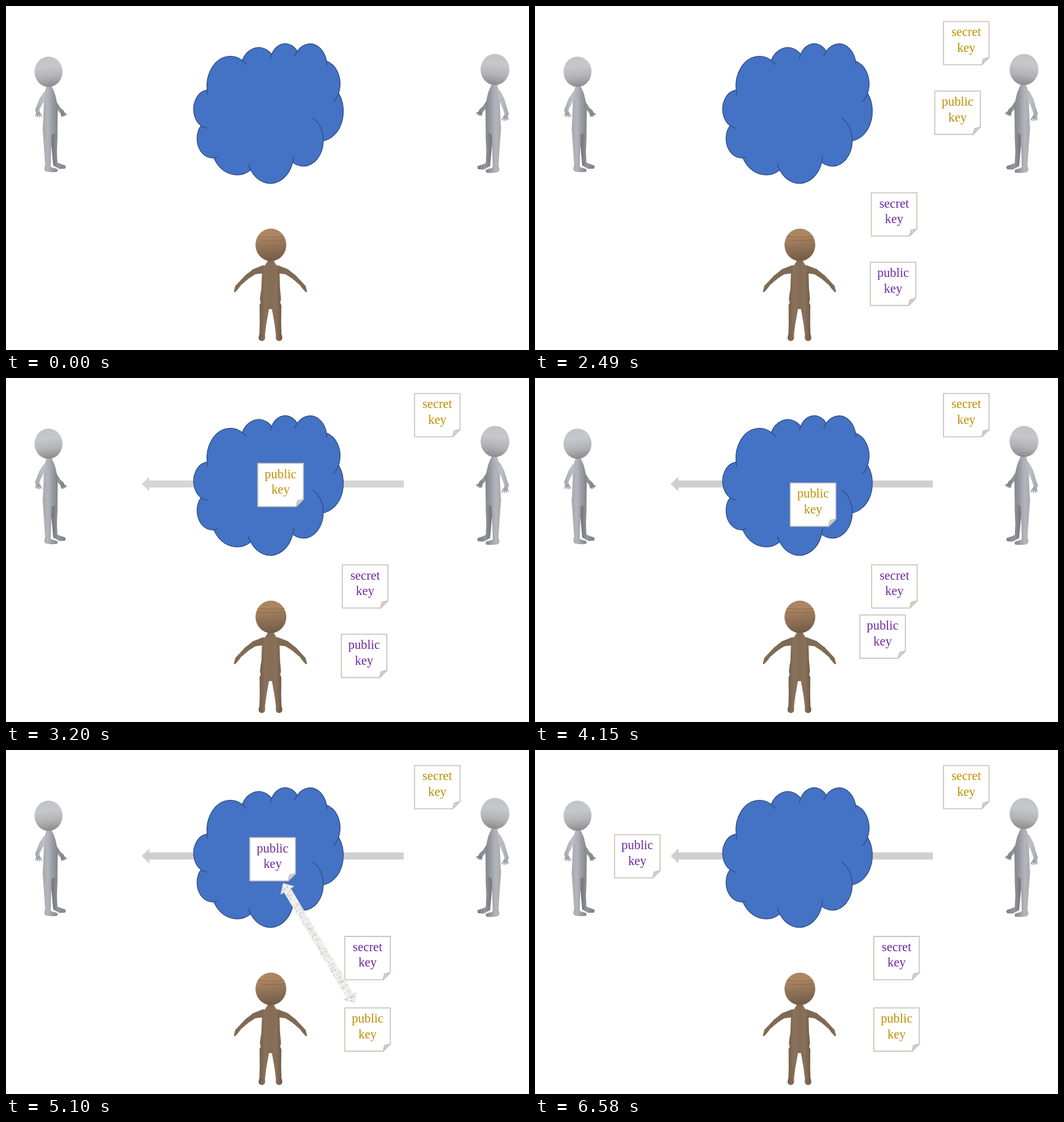
Write an HTML page with a canvas that moves like this. It is 923x607 px and loops after 7.04 s.

```html
<!DOCTYPE html>
<html lang="en">
<head>
<meta charset="utf-8">
<title>Public key exchange</title>
<style>
  html, body { margin: 0; width: 100%; height: 100%; overflow: hidden; background: #fff; }
  canvas { display: block; }
</style>
</head>
<body>
<canvas id="stage" width="923" height="607"></canvas>
<script>
const LOOP = 7040, MOVE = 680;
const GOLD = '#bf8f00', PURPLE = '#6c2aa0';
const stage = document.getElementById('stage');
const ctx = stage.getContext('2d');

const clamp = v => Math.max(0, Math.min(1, v));
const mix = (a, b, p) => a + (b - a) * p;
const ease = p => p < 0.5 ? 2 * p * p : 1 - 2 * (1 - p) * (1 - p);

// Progress 0..1 that advances in steps of `gap` ms from `start`.
function stepped(t, start, gap, length, lead = 0) {
  if (t < start) return 0;
  return clamp((Math.floor((t - start) / gap) * gap + lead) / length);
}

function ramp(x0, y0, x1, y1, ...colors) {
  const g = ctx.createLinearGradient(x0, y0, x1, y1);
  colors.forEach((c, i) => g.addColorStop(i / (colors.length - 1), c));
  return g;
}

// Rounded, tapering body part through joints [x, y, radius].
function limb(fill, ...joints) {
  ctx.beginPath();
  for (let i = 1; i < joints.length; i++) {
    for (let p = 0; p <= 1; p += 1 / 16) {
      const [x, y, r] = joints[i].map((v, k) => mix(joints[i - 1][k], v, p));
      ctx.moveTo(x + r, y);
      ctx.arc(x, y, r, 0, 7);
    }
  }
  ctx.fillStyle = fill;
  ctx.fill();
}

function head(rx, ry, ...colors) {
  ctx.beginPath();
  ctx.ellipse(0, 0, rx, ry, 0, 0, 7);
  ctx.fillStyle = ramp(0, -ry, rx * 0.3, ry, ...colors);
  ctx.fill();
}

function hand(color, x, y, angle, size) {
  for (let i = 0; i < 4; i++) {
    const a = angle + i * 0.3, r = size * (1 - 0.06 * i);
    limb(color, [x, y, 2], [x + r * Math.cos(a), y + r * Math.sin(a), 0.9]);
  }
}

// Side view around the head centre; `facing` is 1 for right, -1 for left.
function sidePerson(x, y, facing, size, reach) {
  const far = ramp(6, 0, 28, 0, '#74767e', '#94969c', '#80828a');
  const skin = ramp(-11, 0, 18, 0, '#a5a8af', '#b4b6bb', '#9699a1', '#7e8087');
  ctx.save();
  ctx.translate(x, y);
  ctx.scale(facing * size, size);
  hand('#7c7e86', 22, 70, 0.5, 11);
  limb(far, [14, 58, 3], [19, 66, 3], [24, 71, 3.5]);
  limb(far, [9, 100, 7], [10, 118, 6], [10.5, 140, 4.5], [12, 163, 4], [20, 167, 4.5], [27, 168, 3.2]);
  limb(skin, [1, 25, 4], [2, 42, 10], [4, 62, 12.5], [3, 98, 13]);
  limb(skin, [-2, 100, 8.5], [-1.5, 134, 6.5], [-1, 165, 5], [-2, 171, 5.5], [5, 173, 4.3], [13, 174, 3]);
  hand('#9fa2aa', -19, 42 + 26 * reach, 1, 13);
  limb(ramp(-22, 0, 2, 0, '#a6a9b0', '#bec0c4', '#aaacb2'),
    [-4, 42, 7], [-12, 42 + 8 * reach, 4.5], [-17, 42 + 19 * reach, 3.5], [-20, 42 + 26 * reach, 3.6]);
  head(24.7, 26.8, '#c2c3c7', '#c6c7ca', '#b2b2b5', '#88878b');
  ctx.restore();
}

function frontPerson() {
  const skin = ramp(-20, 0, 20, 0, '#725e4b', '#89715a', '#846c55', '#8a7058', '#6f5a46');
  ctx.save();
  ctx.translate(466.7, 421.5);
  for (const side of [-1, 1]) {
    const at = (x, y, r) => [side * x, y, r];
    limb('#806a54', at(12, 43, 7), at(28, 47, 5), at(42, 57, 4), at(54, 68.5, 3), at(59, 74.5, 3.4), at(63, 82, 1.6));
    limb(skin, at(10.5, 108, 8.8), at(13, 138, 6), at(14.5, 157, 5), at(15.2, 164, 5.8));
  }
  limb(skin, [0.5, 28, 4.5], [0.5, 49, 15.5], [0.5, 78, 16.5], [0, 95, 18.5]);
  ctx.translate(0.8, 0);
  head(27.2, 28.8, '#ad8663', '#ab8562', '#957457', '#836850', '#705945');
  ctx.strokeStyle = 'rgba(85,60,38,.2)';
  ctx.beginPath();
  for (const y of [-15, -9]) {
    ctx.moveTo(-24, y);
    ctx.quadraticCurveTo(0, y + 3, 24, y);
  }
  ctx.stroke();
  ctx.restore();
}

// Cloud lobes, clockwise: first point, radius, and the degrees each arc runs on inside before and after.
const LOBES = [
  [354.9, 148.3, 41.4, 9, 14], [416.8, 95.9, 32.7, 0, 0], [468.8, 85.2, 26.8, 14, 0],
  [514, 79.8, 29.8, 17, 11], [565.7, 97.2, 32.7, 0, 26], [587, 153.9, 41.5, 0, 0],
  [560, 238, 35.4, 64, 0], [505.9, 275.8, 41.4, 12, 12], [431.9, 289.5, 47.3, 0, 0],
  [366.6, 267.8, 26.7, 15, 0], [344.1, 211.1, 26.6, 26, 0]
];

function cloudPaths() {
  const tall = 1.273, rad = Math.PI / 180;
  const outline = new Path2D(), creases = new Path2D();
  LOBES.forEach(([x, y, r, before, after], i) => {
    const [nx, ny] = LOBES[(i + 1) % LOBES.length];
    // Centre of the arc, found where the lobe is a circle.
    const dx = (nx - x) / 2, dy = (ny - y) / tall / 2, half = Math.hypot(dx, dy);
    const k = Math.sqrt(Math.max(0, r * r - half * half)) / half;
    const cx = x + dx - dy * k, cy = y + (dy + dx * k) * tall;
    const angle = (u, v) => Math.atan2((v - cy) / tall, u - cx);
    const from = angle(x, y), to = angle(nx, ny);
    const arc = (path, a, b) => path.ellipse(cx, cy, r, r * tall, 0, a, b);
    arc(outline, from, to);
    for (const [end, sweep] of [[from, -before], [to, after]]) {
      if (!sweep) continue;
      const a = Math.min(end, end + sweep * rad), b = Math.max(end, end + sweep * rad);
      creases.moveTo(cx + r * Math.cos(a), cy + r * tall * Math.sin(a));
      arc(creases, a, b);
    }
  });
  outline.closePath();
  return [outline, creases];
}

const [cloudOutline, cloudCreases] = cloudPaths();

function cloud() {
  ctx.fillStyle = '#4472c4';
  ctx.fill(cloudOutline);
  ctx.strokeStyle = '#29497f';
  ctx.lineWidth = 1.3;
  ctx.stroke(cloudOutline);
  ctx.stroke(cloudCreases);
}

function poly(...pts) {
  ctx.beginPath();
  pts.forEach(([x, y]) => ctx.lineTo(x, y));
  ctx.closePath();
}

function note(x, y, word, color) {
  const w = 80.3, h = 76.3, d = 12.8;
  const fold = [[x + w - d, y + h], [x + w - d * 0.8, y + h - d * 0.8], [x + w, y + h - d]];
  poly([x, y], [x + w, y], fold[2], fold[0], [x, y + h]);
  ctx.fillStyle = '#fff';
  ctx.fill();
  ctx.strokeStyle = '#c9c4bd';
  ctx.lineWidth = 1.8;
  ctx.lineJoin = 'round';
  ctx.stroke();
  poly(...fold);
  ctx.fillStyle = '#d3d0cc';
  ctx.fill();
  ctx.stroke();
  ctx.fillStyle = color;
  ctx.font = '22.4px "Liberation Serif", serif';
  ctx.textAlign = 'center';
  ctx.fillText(word, x + w / 2, y + 26);
  ctx.fillText('key', x + w / 2, y + 53.4);
}

// Arrow outline along the x axis; `tail` adds a second head at the far end.
function arrow(len, head, wide, thin, tail) {
  const side = s => [
    [head, s * wide], [head, s * thin],
    ...(tail ? [[len - head, s * thin], [len - head, s * wide]] : [[len, s * thin]])
  ];
  poly([0, 0], ...side(-1), ...(tail ? [[len, 0]] : []), ...side(1).reverse());
}

function longArrow() {
  ctx.save();
  ctx.translate(239.5, 187);
  arrow(462.5, 13.5, 13, 6.2, false);
  ctx.fillStyle = '#d0cece';
  ctx.fill();
  ctx.restore();
}

function marbleArrow() {
  const len = 246, wide = 14.3;
  ctx.save();
  ctx.translate(489, 235);
  ctx.rotate(Math.atan2(211, 126));
  arrow(len, 15, wide, 7, true);
  ctx.fillStyle = '#efefee';
  ctx.fill();
  ctx.clip();
  let seed = 17;
  const rnd = () => (seed = seed * 16807 % 2147483647) / 2147483647;
  for (let i = 0; i < 420; i++) {
    ctx.fillStyle = ['#dcdcda', '#d3d3d1', '#f8f8f7', '#c9cac8'][i % 4];
    ctx.beginPath();
    ctx.ellipse(rnd() * len, (rnd() * 2 - 1) * wide, 0.8 + rnd() * 1.8, 0.5 + rnd(), rnd() * 3, 0, 7);
    ctx.fill();
  }
  ctx.restore();
}

function faded(alpha, paint) {
  if (alpha <= 0) return;
  ctx.globalAlpha = alpha;
  paint();
  ctx.globalAlpha = 1;
}

function draw(t) {
  const notesIn = stepped(t, 780, 80, 200, 40);
  const send = ease(stepped(t, 2490, 80, MOVE));
  const arrowIn = stepped(t, 3130, 70, 130, 40);
  const swap = ease(stepped(t, 3980, 81.25, MOVE));
  const marble = stepped(t, 4700, 80, 200, 40) - stepped(t, 5570, 76.7, 200, 40);
  const deliver = ease(stepped(t, 5570, 76.7, MOVE, 17));

  ctx.fillStyle = '#fff';
  ctx.fillRect(0, 0, stage.width, stage.height);
  sidePerson(75, 116, 1, 1, 1);
  sidePerson(863, 112, -1, 1.03, 1.3);
  frontPerson();
  faded(arrowIn, longArrow);
  cloud();
  faded(notesIn, () => {
    note(721, 27.4, 'secret', GOLD);
    note(mix(593.6, 598, swap), mix(329.6, 329, swap), 'secret', PURPLE);
    const bend = 0.38 * swap + 0.62 * swap * swap;
    note(mix(mix(705.6, 442.6, send), 598, bend), mix(mix(150.2, 150.6, send), 455.2, swap), 'public', GOLD);
    note(mix(mix(591.8, 430.4, swap), 140.4, deliver), mix(mix(452.2, 154.6, swap), 149.4, deliver), 'public', PURPLE);
  });
  faded(marble, marbleArrow);
}

const begin = performance.now();
function tick() {
  draw((performance.now() - begin) % LOOP);
  requestAnimationFrame(tick);
}
tick();
</script>
</body>
</html>
```
